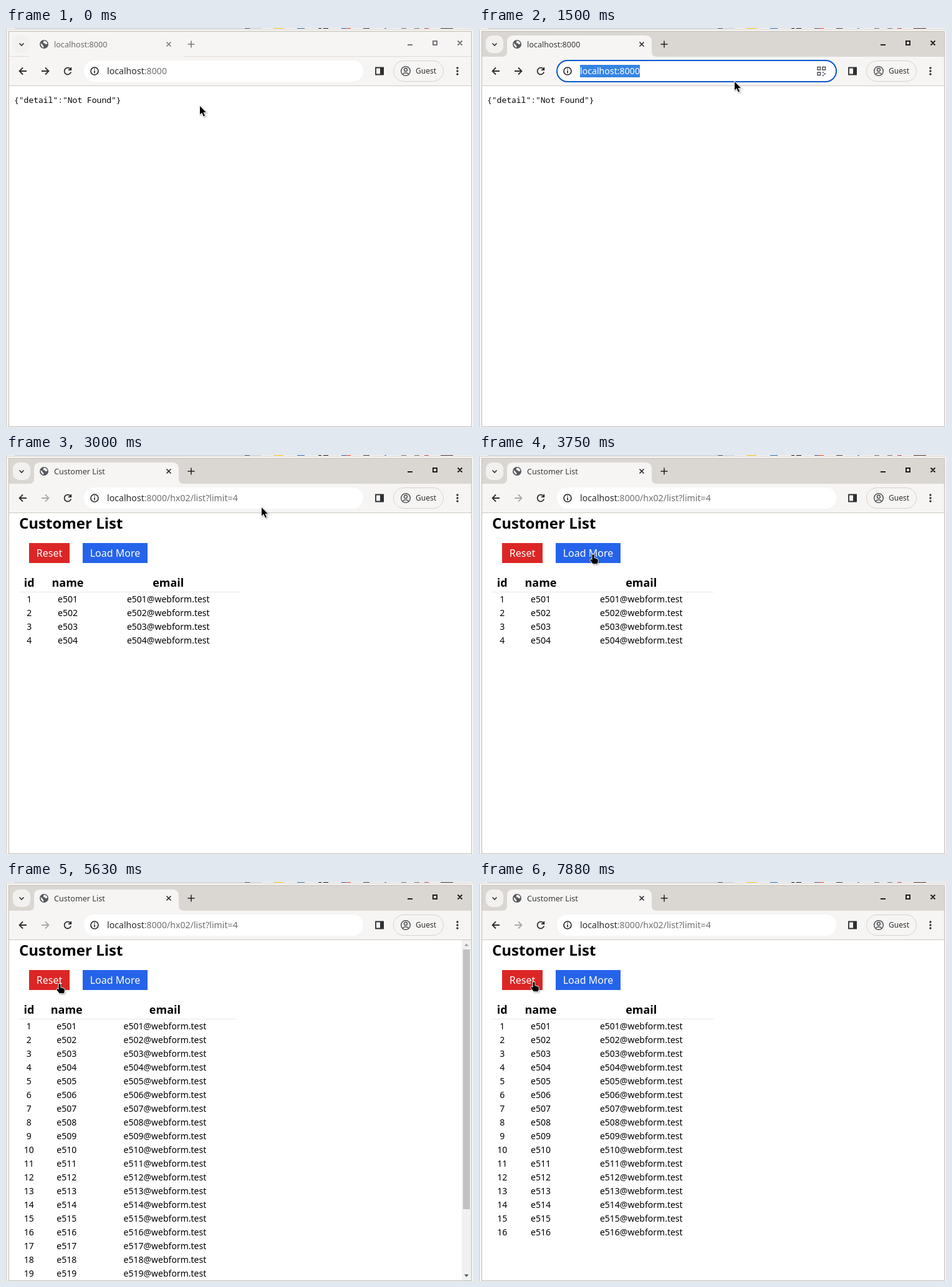
An HTML page that plays this animation: 749x639 px, repeating every 8 s.

```html
<!DOCTYPE html>
<html lang="en">
<head>
<meta charset="utf-8">
<title>Customer List</title>
<style>
  html, body { margin: 0; width: 100%; height: 100%; overflow: hidden; background: #f4f3f2; }
  body { position: relative; font-family: "Noto Sans", sans-serif; }
  svg { position: absolute; left: 0; top: 0; }
  svg text { font-family: "Noto Sans", sans-serif; white-space: pre; }
  .line { fill: none; stroke: currentColor; }
  .fill { fill: currentColor; }

  #strip { fill: #dad7d3; }
  #frame { color: #202020; }
  #tabTitle { fill: #3b3b3b; font-size: 12.6px; }
  .blurred #strip { fill: #f6f5f4; }
  .blurred #frame { color: #77777a; }
  .blurred #tabTitle { fill: #6a6a6a; }
  .url { font-size: 14.17px; fill: #707070; }
  .url .host { fill: #2b2b2b; }
  .url.selected, .url.selected .host { fill: #fff; }

  #page { position: absolute; left: 5px; top: 93px; width: 741px; height: 545px; overflow: hidden; background: #fff; color: #000; }
  #page > div { position: absolute; inset: 0; }
  pre { position: absolute; left: 8px; top: 13px; margin: 0; font: 13px/19px "Noto Sans Mono", monospace; }
  h2 { position: absolute; left: 16px; top: 0; margin: 0; font: 700 24px/32px "Noto Sans", sans-serif; }
  .button { position: absolute; top: 48px; height: 32px; font-size: 16px; line-height: 32px; text-align: center; color: #fff; }
  #reset { left: 32px; width: 65px; background: #dc2626; }
  #more { left: 118px; width: 104px; background: #2563eb; }
  table { position: absolute; left: 16px; top: 96px; width: 355px; border-spacing: 0; text-align: center; }
  .long table { width: 347px; }
  th { padding: 1px; font-size: 18px; line-height: 28px; border-bottom: 1px solid #e5e7eb; }
  td { padding: 1px; font-size: 14px; line-height: 20px; }
  [hidden] { display: none !important; }

  #bar { position: absolute; right: 0; top: 0; width: 15px; height: 545px; background: #f1f1f1; display: none; }
  .long #bar { display: block; }
  #thumb { position: absolute; left: 2px; top: 15px; width: 11px; background: #c1c1c1; }
  #cursors g { filter: drop-shadow(1px 1px 1px rgba(0, 0, 0, .35)); }
</style>
</head>
<body>
<svg id="chrome" width="749" height="639" viewBox="0 0 749 639">
  <path d="M0 2H749" stroke="#d8d4d0"/>
  <path d="M.5 2V639" stroke="#cfcac5"/>
  <path d="M14 .5H410" stroke="#c9d3de"/>
  <g id="specks"></g>
  <rect x="4.5" y="5.5" width="742" height="633" fill="#f6f5f4" stroke="#c5beb7"/>
  <rect id="strip" x="5" y="6" width="741" height="40"/>
  <path id="tabEdge" class="line" d="M5 45.5H37M285 45.5H746" color="#dedad6"/>
  <path d="M37 46Q45 46 45 38V22Q45 12 55 12H267Q277 12 277 22V38Q277 46 285 46Z" fill="#f6f5f4"/>
  <rect x="11" y="12" width="28" height="28" rx="10" fill="#f3f1ef"/>
  <path class="line" d="M21.5 24.5L25 28L28.5 24.5" color="#333" stroke-width="1.6"/>
  <circle cx="61" cy="26" r="7" fill="#56595d"/>
  <path d="M55.500 24.500Q58 25 59 27.500Q61 28.500 60 31.500Q56 30 55.500 24.500M60.500 20.500Q65 20 66.500 25L64 26.500L62 24.500L59.500 24Z" fill="#f6f5f4"/>
  <text id="tabTitle" x="77" y="31"></text>
  <g id="frame">
    <path class="line" stroke-width="1.5" d="M257.500 22.500L264.500 29.500M264.500 22.500L257.500 29.500M297 20.500V31.500M291.500 26H302.500"/>
    <path class="line" stroke-width="2" d="M644 27H652M685 21H691V27H685ZM724.500 20.500L731.500 27.500M731.500 20.500L724.500 27.500"/>
  </g>

  <path d="M5 92.500H746" stroke="#cec8c2"/>
  <g color="#2d2f31" stroke-width="1.8">
    <path class="line" d="M33 69H22M27 63.500L21.500 69L27 74.500"/>
    <path id="forward" class="line" d="M57 69H68M63 63.500L68.500 69L63 74.500"/>
    <path class="line" d="M103.500 66A5.400 5.400 0 1 0 104.200 70.500M104.300 63V67.200H100"/>
    <path class="line" d="M593 63.500H605V74.500H593Z"/>
    <path class="fill" d="M600 63H606V75H600Z"/>
    <g class="fill"><circle cx="724" cy="64" r="1.700"/><circle cx="724" cy="69" r="1.700"/><circle cx="724" cy="74" r="1.700"/></g>
  </g>
  <rect x="621.500" y="52.500" width="80" height="33" rx="16.500" fill="none" stroke="#d6d2ce"/>
  <g class="line" color="#505356" stroke-width="1.500">
    <circle cx="641" cy="69" r="7.300"/><circle cx="641" cy="67" r="2.500"/><path d="M636 74Q641 69.500 646 74"/>
  </g>
  <text x="657" y="73.300" font-size="12" fill="#303030">Guest</text>
  <rect id="pill" x="125" y="52" width="448" height="34" rx="17" fill="#fff"/>
</svg>

<div id="page">
  <div id="notFound"><pre>{"detail":"Not Found"}</pre></div>
  <div id="list">
    <h2>Customer List</h2>
    <div class="button" id="reset">Reset</div>
    <div class="button" id="more">Load More</div>
    <table>
      <thead><tr><th>id</th><th>name</th><th>email</th></tr></thead>
      <tbody id="rows"></tbody>
    </table>
    <div id="bar">
      <div id="thumb"></div>
      <svg width="15" height="545"><path d="M4 9.500L7.500 5.500L11 9.500Z" fill="#a3a3a3"/><path d="M4 535.500L7.500 539.500L11 535.500Z" fill="#505050"/></svg>
    </div>
  </div>
</div>

<svg id="overlay" width="749" height="639" viewBox="0 0 749 639">
  <g id="popup">
    <rect x="124" y="51" width="450" height="134" rx="17" fill="#fff" style="filter:drop-shadow(0 2px 3px rgba(0,0,0,.3))"/>
    <path d="M124 93H566Q574 93 574 101V125Q574 133 566 133H124Z" fill="#ececec"/>
    <g fill="#5f6368"><circle cx="142" cy="69" r="7"/><circle cx="142" cy="113" r="7"/><circle cx="142" cy="155" r="7"/></g>
    <text class="url" x="162" y="118"><tspan fill="#1f5fbf">localhost:8000/hx02/list?limit=4</tspan></text>
    <text class="url" x="162" y="160"><tspan fill="#1f5fbf">localhost:8000</tspan></text>
    <path id="caret" d="M373.500 60V78" stroke="#222"/>
  </g>
  <g id="focus">
    <rect x="125" y="52" width="448" height="34" rx="17" fill="#fff" stroke="#0b57d0" stroke-width="2"/>
    <rect x="162" y="59" width="96" height="20" fill="#3584e4"/>
    <g class="line" color="#4a4d50" stroke-width="1.500">
      <path d="M543 62.500H547.500V67H543ZM551 62.500H555.500V67H551ZM543 71H547.500V75.500H543Z"/>
      <path d="M550.500 71H553M553 73.500H556M550.500 76H553"/>
    </g>
  </g>
  <g id="info" color="#202124">
    <circle class="line" cx="142" cy="69" r="6" stroke-width="1.600"/>
    <path class="line" d="M142 68V72.500M142 65V66.600" stroke-width="1.600"/>
  </g>
  <text id="url" class="url" x="162" y="74"><tspan class="host">localhost</tspan><tspan id="path"></tspan></text>
  <g id="cursors" stroke="#fff" paint-order="stroke">
    <g id="arrow"><path stroke-width="1.600" d="M0 0V13.500L3.200 10.600L5.800 16.600L8 15.600L5.400 10H9.800Z"/></g>
    <g id="beam"><path stroke="#fff" stroke-width="3" fill="none" d="M1 1H7M4 1V16M1 16H7"/><path stroke="#000" fill="none" d="M1 1H7M4 1V16M1 16H7"/></g>
    <g id="hand"><path stroke-width="1.800" d="M4.500 2.500A1.500 1.500 0 0 1 7.500 2.500V7L12 8.200Q13.800 8.800 13.800 10.500V13L12.800 16.300H5.800L1.500 11A1.300 1.300 0 0 1 3.400 9.300L4.500 10.200Z"/></g>
  </g>
</svg>

<script>
  const LOOP = 8000;
  const $ = id => document.getElementById(id);
  const show = (id, on) => $(id).style.display = on ? "" : "none";

  // [start, value...]: each entry holds until the next begins
  const rowSteps = [[0, 0], [2630, 4], [4130, 8], [4250, 12], [4500, 16], [4750, 20], [5000, 24],
    [5880, 0], [6630, 4], [6880, 8], [7130, 12], [7500, 16]];
  const cursorSteps = [
    [0, "arrow", 311, 125], [250, "arrow", 301, 118], [380, "arrow", 285, 104], [500, "arrow", 266, 90],
    [630, "beam", 250, 65], [1380, "beam", 342, 68], [1500, "arrow", 410, 86], [3000, "arrow", 410, 84],
    [3130, "beam", 368, 50], [3250, "beam", 264, 58], [3380, "arrow", 149, 112], [3500, "hand", 178, 159],
    [3750, "hand", 177, 158], [5130, "hand", 158, 160], [5250, "arrow", 112, 166], [5380, "hand", 88, 168],
    [5500, "hand", 83, 167], [5630, "hand", 80, 162], [6000, "arrow", 110, 160], [6130, "hand", 150, 156],
    [6250, "hand", 184, 154], [7630, "hand", 150, 158], [7750, "arrow", 108, 160], [7880, "hand", 82, 159]];
  const at = (steps, t) => steps.filter(s => s[0] <= t).pop();

  const specks = [[383, 8, "#555"], [429, 16, "#fbc70a"], [467, 12, "#2d73b9"], [501, 5, "#222"], [509, 8, "#222"],
    [538, 8, "#2a5bb0"], [544, 9, "#e8452c"], [573, 10, "#444"], [607, 3, "#3b82c4"], [634, 8, "#777"],
    [655, 8, "#777"], [671, 7, "#c44"], [697, 20, "#593a2d"]];
  $("specks").innerHTML = specks.map(([x, w, c]) => `<rect x="${x}" width="${w}" height="1" fill="${c}"/>`).join("");

  const customer = i => {
    const name = "e" + (500 + i);
    return `<tr><td>${i}</td><td>${name}</td><td>${name}@webform.test</td></tr>`;
  };
  $("rows").innerHTML = Array.from({ length: 24 }, (_, i) => customer(i + 1)).join("");

  function draw(t) {
    const loaded = t >= 2500;
    const typing = t >= 1880 && t < 2380;
    const selected = t >= 1130 && t < 1880;
    const count = at(rowSteps, t)[1];

    document.body.classList.toggle("blurred", t < 1000);
    show("tabEdge", t < 1000);
    $("tabTitle").textContent = loaded ? "Customer List" : "localhost:8000";
    $("forward").style.color = loaded ? "#aaa9a8" : "";
    $("path").textContent = t < 1880 ? ":8000" : ":8000/hx02/list?limit=4";
    $("url").classList.toggle("selected", selected);
    show("focus", selected);
    show("popup", typing);
    show("info", !typing);

    show("notFound", !loaded);
    show("list", loaded);
    [...$("rows").children].forEach((row, i) => row.hidden = i >= count);
    $("list").classList.toggle("long", count > 16);
    $("thumb").style.height = 515 * 545 / (147 + 22 * count) + "px";

    const [, shape, x, y] = at(cursorSteps, t);
    for (const id of ["arrow", "beam", "hand"]) show(id, id === shape);
    $("cursors").setAttribute("transform", `translate(${x} ${y})`);
  }

  const start = performance.now();
  function tick() {
    draw((performance.now() - start) % LOOP);
    requestAnimationFrame(tick);
  }
  tick();
</script>
</body>
</html>
```
